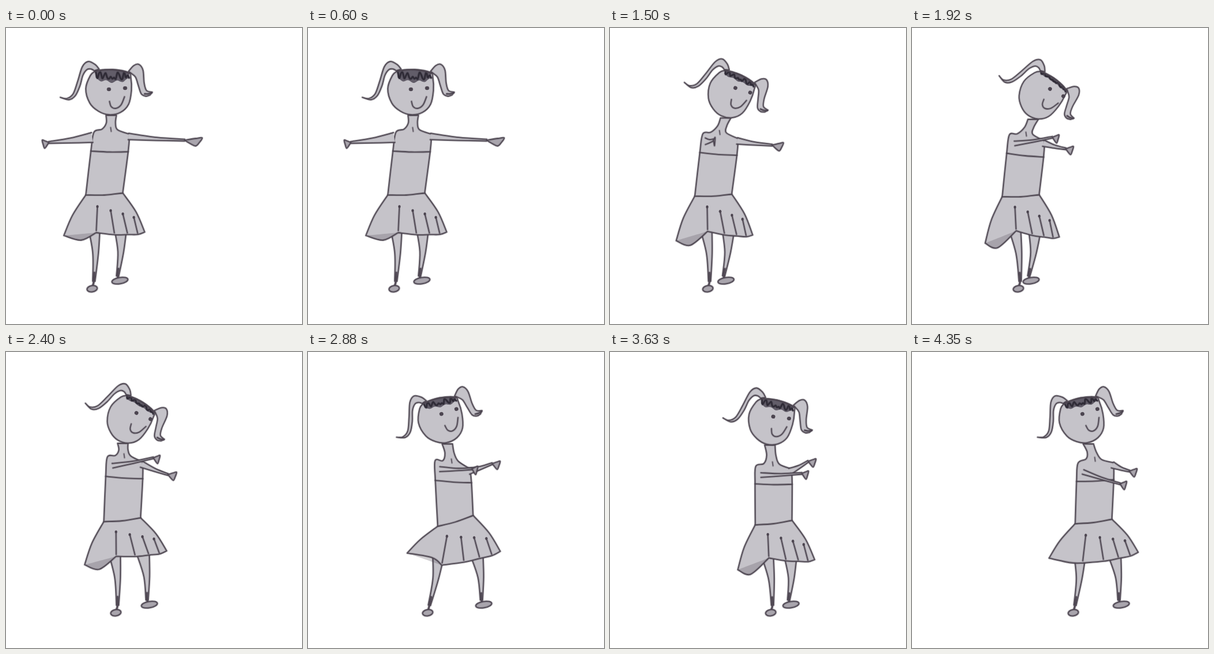
Animation, 512 px wide and 512 px high, one loop 4.38 s. Source, as an HTML page with a canvas:

```html
<!DOCTYPE html>
<html lang="en">
<head>
<meta charset="utf-8">
<title>Walking girl drawing</title>
<style>
  html, body { margin: 0; width: 100%; height: 100%; overflow: hidden; background: #fff; }
  canvas { display: block; }
</style>
</head>
<body>
<canvas id="stage" width="512" height="512"></canvas>
<script>
const ctx = document.getElementById('stage').getContext('2d');
const LOOP = 4380, STEP = 30, HOLD = 90;
const GREY = '#c5c3c9', SHADE = '#a9a5ad', INK = '#4c4550', DARK = '#2d2934';

// Poses of the walk: head, chest and waist as x, y, tilt; hands as x, y; feet as x.
// Everything else hangs on these points.
const poses = [
  { at: 850, head: [178, 110, 0], chest: [183, 182, 3], waist: [170, 287, -3], handL: [68, 199], handR: [325, 195], feet: [149, 197] },
  { at: 1920, head: [222, 117, 33], chest: [199, 190, 10], waist: [188, 290, -3], handL: [249, 190], handR: [273, 210], feet: [184, 206] },
  { at: 2400, head: [212, 117, 28], chest: [206, 186, 8], waist: [201, 290, -6], handL: [261, 184], handR: [288, 213], feet: [190, 248] },
  { at: 2880, head: [230, 118, -14], chest: [250, 195, 13], waist: [255, 292, -17], handL: [289, 203], handR: [326, 194], feet: [207, 304] },
  { at: 3630, head: [278, 120, 11], chest: [283, 200, 4], waist: [283, 295, -7], handL: [338, 211], handR: [350, 190], feet: [278, 313] },
  { at: 4350, head: [294, 118, -14], chest: [318, 192, -1], waist: [314, 293, -7], handL: [366, 229], handR: [383, 207], feet: [279, 362] }];

// Monotone cubic interpolation between poses, starting from rest
function poseAt(t) {
  const last = poses.length - 1;
  t = Math.min(Math.max(t, poses[0].at), poses[last].at);
  const i = Math.min(last, Math.max(1, poses.findIndex(p => p.at > t))) - 1 || 0;
  const k = t === poses[last].at ? last - 1 : i;
  const span = poses[k + 1].at - poses[k].at, u = (t - poses[k].at) / span;
  const value = (part, c) => {
    const slope = n => (poses[n + 1][part][c] - poses[n][part][c]) / (poses[n + 1].at - poses[n].at);
    const tangent = n => {
      if (n === 0) return 0;
      if (n === last) return slope(n - 1);
      const p = slope(n - 1), q = slope(n);
      return p * q <= 0 ? 0 : 2 * p * q / (p + q);
    };
    const a = poses[k][part][c], b = poses[k + 1][part][c];
    return a + (b - a) * u * u * (3 - 2 * u) +
      span * u * (1 - u) * (tangent(k) * (1 - u) - tangent(k + 1) * u);
  };
  const pose = {};
  for (const part of ['head', 'chest', 'waist', 'handL', 'handR', 'feet'])
    pose[part] = poses[k][part].map((_, c) => value(part, c));
  return pose;
}

const clamp01 = v => Math.min(1, Math.max(0, v));
const lerp = (a, b, u) => a + (b - a) * u;
const mix = (a, b, u) => [lerp(a[0], b[0], u), lerp(a[1], b[1], u)];
const move = (p, x, y) => [p[0] + x, p[1] + y];
const radians = degrees => degrees * Math.PI / 180;

// End of a tilted bar, side -1 or 1
function barEnd([x, y, tilt], half, side) {
  const r = radians(tilt);
  return [x + side * half * Math.cos(r), y + side * half * Math.sin(r)];
}

// Smooth runs of points; runs meet in corners
function curve(runs, closed) {
  const path = new Path2D();
  runs.forEach((p, n) => {
    n ? path.lineTo(...p[0]) : path.moveTo(...p[0]);
    for (let i = 0; i < p.length - 1; i++) {
      const a = p[i - 1] || p[i], b = p[i], c = p[i + 1], d = p[i + 2] || c;
      path.bezierCurveTo(b[0] + (c[0] - a[0]) / 6, b[1] + (c[1] - a[1]) / 6,
        c[0] - (d[0] - b[0]) / 6, c[1] - (d[1] - b[1]) / 6, ...c);
    }
  });
  if (closed) path.closePath();
  return path;
}

function paint(path, color) {
  ctx.fillStyle = color;
  ctx.fill(path);
}

// Pencil line: a soft edge around a darker core
function stroke(path, width = 1.8, color = INK) {
  ctx.strokeStyle = color;
  ctx.globalAlpha = .35;
  ctx.lineWidth = width + 2;
  ctx.stroke(path);
  ctx.globalAlpha = .95;
  ctx.lineWidth = width;
  ctx.stroke(path);
  ctx.globalAlpha = 1;
}

const line = (points, width, color) => stroke(curve([points]), width, color);

function shape(runs, color = GREY) {
  const path = curve(runs, true);
  paint(path, color);
  stroke(path);
}

function oval([x, y], rx, ry, angle) {
  const path = new Path2D();
  path.ellipse(x, y, rx, ry, angle, 0, 7);
  return path;
}

function limb(points, widths) {
  const edge = side => points.map((p, i) => {
    const a = points[i - 1] || p, b = points[i + 1] || p;
    const dx = b[0] - a[0], dy = b[1] - a[1];
    const k = side * widths[i] / 2 / (Math.hypot(dx, dy) || 1);
    return move(p, -dy * k, dx * k);
  });
  const one = edge(1), two = edge(-1);
  paint(curve([one, two.slice().reverse()], true), GREY);
  line(one);
  line(two);
}

function drawLeg(hip, ankle, foot, rx, ry) {
  const knee = move(mix(hip, ankle, .5), 3, 0);
  limb([hip, knee, ankle], [22, 10, 4]);
  line([mix(knee, ankle, .7), ankle, mix(ankle, foot, .6)], 3);
  const sole = oval(foot, rx, ry, -.17);
  paint(sole, SHADE);
  stroke(sole);
}

function drawArm(root, hand, width, half) {
  const wrist = move(hand, -half, -1);
  limb([root, move(mix(root, wrist, .5), 0, 1), wrist], [width, width * .5, 3]);
  const tip = move(hand, half * .9, -5), low = move(hand, half * .2, 9);
  shape([[wrist, move(hand, half * .2, -4), tip, move(hand, half * .6, 3), low,
    move(hand, -half * .4, 5), wrist]], SHADE);
}

// The hem follows the stride of each foot.
function drawSkirt(wl, wr, waist, strideL, strideR) {
  const drop = strideL * .6;
  const at = (x, y) => move(waist, x, y);
  const l = at(-70 + strideL * .5, 72 + drop), r = at(70 + strideR * .35, 66 - strideR * .6);
  const fold = at(-40, 80 + drop), inner = at(-14 + drop * .6, 67 - drop * .6);
  const hem = [inner, ...[.38, .65, .86].map(u => move(mix(inner, r, u), 0, 4))];
  shape([[wl, move(mix(wl, l, .5), -4, 0), l], [l, fold, inner],
    [...hem, r], [r, move(mix(wr, r, .5), 4, -1), wr]]);
  ctx.globalAlpha = .25;
  paint(curve([[l, fold, inner], [inner, l]], true), INK);
  ctx.globalAlpha = 1;
  hem.forEach((end, i) => {
    const top = mix(mix(wl, wr, .33 + .27 * i), end, .32 + .09 * i);
    line([top, mix(top, end, .92)]);
    paint(oval(top, 2.2, 2.6, 0), INK);
  });
}

function drawTorso(chest, head, sl, sr, wl, wr) {
  const top = [head[0] + 4 - head[2] / 2, head[1] + 41];
  const base = move(chest, -2, -7), mid = mix(top, base, .55);
  const cl = move(mix(sl, wl, .3), -1, 0), cr = move(mix(sr, wr, .3), 1, 0);
  shape([
    [move(top, -9, 0), move(mid, -8, 0), move(base, -15, 0), sl, cl, wl],
    [wl, move(mix(wl, wr, .5), 0, 2), wr],
    [wr, cr, sr],
    [sr, move(base, 12, 1), move(mid, 8, 0), move(top, 9, 0)]]);
  line([cl, move(mix(cl, cr, .5), 0, 1), cr]);
  line([move(base, 0, -3), move(base, 1, 4)], 1.2);
}

function drawHair(depth) {
  let seed = 7;
  const random = () => (seed = seed * 16807 % 2147483647) / 2147483647;
  const top = x => -38 + x * x / 200;
  const thick = x => depth * (21 - (x - 4) ** 2 / 90 + 2 * Math.sin(x / 3));
  const upper = [], lower = [], scribble = [];
  for (let x = -23; x <= 35; x += 2.9) {
    upper.push([x, top(x)]);
    lower.unshift([x, top(x) + thick(x)]);
    scribble.push([x, top(x) + thick(x) * random()]);
  }
  paint(curve([upper, lower], true), '#625d69');
  line(scribble, 2.6, DARK);
  line(upper, 2.2);
}

function drawHead([x, y, tilt]) {
  const turn = Math.abs(tilt);
  ctx.save();
  ctx.translate(x, y);
  ctx.rotate(radians(tilt));
  ctx.scale(1 - turn / 500, 1);
  // pigtails
  shape([
    [[-84, 10], [-73, 12], [-62, 4], [-54, -18], [-46, -43], [-36, -52], [-24, -47], [-17, -39]],
    [[-25, -36], [-31, -39], [-38, -38], [-45, -28], [-50, -10], [-58, 7], [-69, 14], [-84, 10]]]);
  shape([
    [[34, -35], [43, -45], [52, -47], [59, -37], [61, -15], [65, -2], [75, 1]],
    [[71, 6], [64, 8], [56, 4], [51, -10], [46, -25], [38, -32]]]);
  line([[62, 4], [68, 4], [74, 2]], 2.4);

  shape([[[-23, -36], [-32, -28], [-40, -5], [-33, 20], [-18, 34], [0, 40], [20, 36],
    [34, 22], [39, -2], [38, -24], [34, -33], [7, -38], [-23, -36]]]);
  drawHair(Math.max(.2, 1 - turn * .022));

  // the face slides as the head turns
  ctx.translate(turn * .25, -turn * .45);
  for (const eye of [[0, -4], [28, -6]]) paint(oval(eye, 3.6, 3.3, 0), INK);
  line([[1, 17], [4, 26], [12, 29], [21, 23], [27, 9]]);
  ctx.restore();
}

function draw(t) {
  ctx.clearRect(0, 0, 512, 512);
  const { head, chest, waist, handL, handR, feet } = poseAt(t);
  const sl = barEnd(chest, 31, -1), sr = barEnd(chest, 31, 1);
  const wl = barEnd(waist, 32, -1), wr = barEnd(waist, 32, 1);
  const footL = [feet[0], 451], footR = [feet[1], 437];
  const strideL = feet[0] - waist[0] + 21, strideR = feet[1] - waist[0] - 27;

  drawLeg(move(waist, 28 + strideR * .4, 58), move(footR, -4, -8), footR, 14, 5.5);
  drawLeg(move(waist, -18 + strideL * .4, 52), move(footL, 3, -13), footL, 9, 5.5);
  drawSkirt(wl, wr, waist, strideL, strideR);
  drawTorso(chest, head, sl, sr, wl, wr);

  // arms thin out as they swing in front of the body
  const stretch = clamp01((handR[0] - sr[0] - 45) / 65);
  drawArm(move(sr, -2, 4), handR, 11, lerp(7, 16, stretch));
  const across = clamp01((handL[0] - sl[0] + 80) / 160);
  drawArm(move(sl, lerp(-3, 9, across), lerp(9, 15, across)), handL,
    lerp(17, 8, across), lerp(-6, 6, across));
  drawHead(head);
}

ctx.lineCap = ctx.lineJoin = 'round';
const start = performance.now();
function frame() {
  const t = (performance.now() - start) % LOOP;
  draw(t < HOLD ? 0 : Math.floor(t / STEP) * STEP);
  requestAnimationFrame(frame);
}
frame();
</script>
</body>
</html>
```
